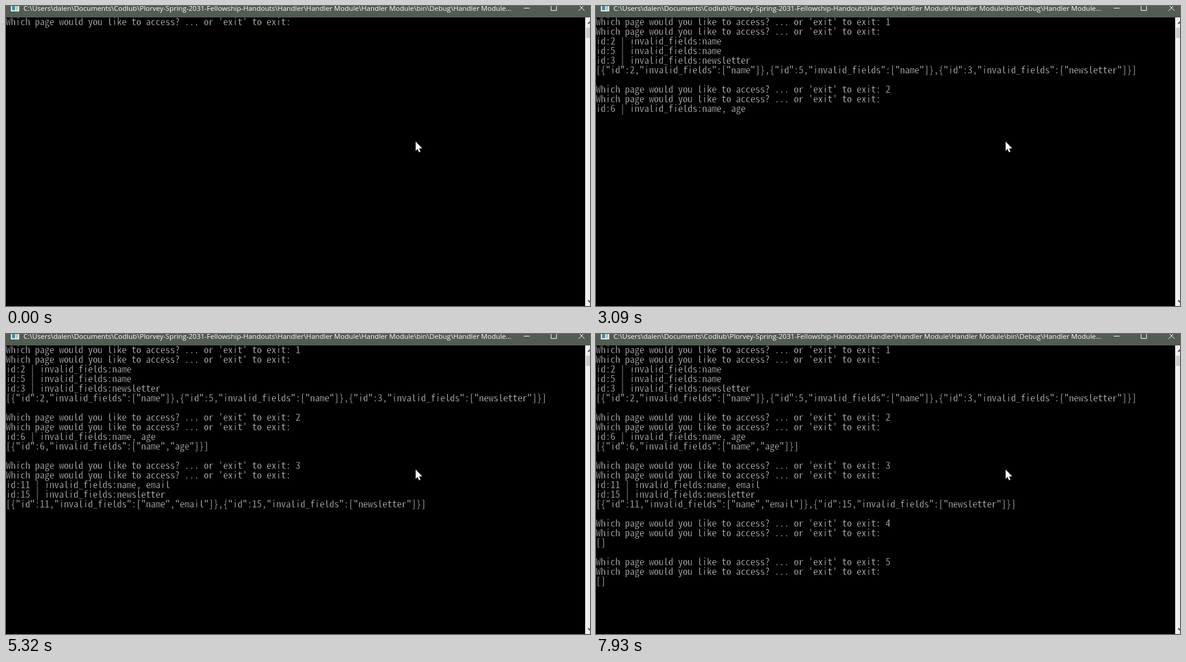
Write an HTML page with a canvas that moves like this. It is 968 px wide and 498 px high and loops after 8000 ms.

```html
<!DOCTYPE html>
<html lang="en">
<head>
<meta charset="utf-8">
<title>Console</title>
<style>
  html, body { margin: 0; width: 100%; height: 100%; overflow: hidden; background: #000; }
  canvas { display: block; }
</style>
</head>
<body>
<canvas id="stage" width="968" height="498"></canvas>
<script>
const ctx = document.getElementById('stage').getContext('2d');
const LOOP = 8000, CELL = 8, ROW = 16, TOP = 19;
const MONO = "'Noto Sans Mono CJK JP', 'Noto Sans Mono CJK SC', 'Noto Sans Mono', monospace";
const TITLE = 'C:\\Users\\dalen\\Documents\\Codlub\\Plorvey-Spring-2031-Fellowship-Handouts' +
  '\\Handler\\Handler Module\\Handler Module\\bin\\Debug\\Handler Module...';
const PROMPT = "Which page would you like to access? ... or 'exit' to exit: ";

const info = ([id, ...fields]) => `id:${id} | invalid_fields:${fields.join(', ')}\n`;
const json = list =>
  JSON.stringify(list.map(([id, ...fields]) => ({ id, invalid_fields: fields }))) + '\n\n';

const page1 = [[2, 'name'], [5, 'name'], [3, 'newsletter']];
const page2 = [[6, 'name', 'age']];
const page3 = [[11, 'name', 'email'], [15, 'newsletter']];
const lines = list => list.map(info).join('');

// [time in ms, text printed, caret visible]
const events = [
  [0, PROMPT, false],
  [510, '1', true],
  [590, '', false],
  [770, '\n' + PROMPT, false],
  [870, '', true],
  [1380, '\n' + lines(page1), false],
  [1460, json(page1), true],
  [2170, '', false],
  [2630, PROMPT, true],
  [2810, '2', true],
  [3040, '\n' + PROMPT, false],
  [3090, '\n' + lines(page2), false],
  [3140, json(page2), true],
  [3740, '', false],
  [3940, PROMPT, false],
  [3970, '', true],
  [4170, '3', true],
  [4250, '', false],
  [4480, '\n' + PROMPT, false],
  [4580, '\n' + lines(page3) + json(page3), true],
  [5320, '', false],
  [5500, PROMPT, true],
  [5830, '4', false],
  [6060, '\n' + PROMPT, false],
  [6160, '\n' + json([]), true],
  [6860, PROMPT, true],
  [7040, '5', true],
  [7230, '\n' + PROMPT, false],
  [7270, '\n' + json([]), false],
  [7310, '', true],
  [7930, '', false]
];

// Choose the font size whose advance equals one console cell
ctx.font = `100px ${MONO}`;
const monoFont = `${100 * CELL / ctx.measureText('0').width}px ${MONO}`;

function rect(color, x, y, w, h) {
  ctx.fillStyle = color;
  ctx.fillRect(x, y, w, h);
}

function path(points) {
  ctx.beginPath();
  points.forEach(([x, y]) => ctx.lineTo(x, y));
}

function polygon(color, points) {
  path(points);
  ctx.fillStyle = color;
  ctx.fill();
}

function drawTitleBar() {
  rect('#525c52', 0, 0, 968, TOP);
  rect('#e8eeee', 8, 0, 14, 9);
  rect('#3f8f96', 10, 0, 5, 7);
  rect('#b9c4c6', 16, 0, 4, 7);

  ctx.font = "11.55px 'Open Sans', 'Noto Sans', sans-serif";
  ctx.fillStyle = '#fff';
  ctx.fillText(TITLE, 29, 8);

  rect('#fff', 858, 3, 10, 1);
  ctx.strokeStyle = '#fff';
  ctx.lineWidth = 1;
  ctx.strokeRect(903.5, -1.5, 9, 9);
  path([[949, -2], [959, 8]]);
  ctx.stroke();
  path([[959, -2], [949, 8]]);
  ctx.stroke();
}

function drawScrollBar() {
  rect('#f0f0f0', 960, TOP, 8, 479);
  rect('#cdcdcd', 961, 36, 7, 17);
  polygon('#505050', [[964, 29], [968, 25], [968, 28], [966, 30]]);
  polygon('#505050', [[964, 489], [968, 493], [968, 490], [966, 488]]);
}

function drawConsole(time) {
  const past = events.filter(([start]) => start <= time);
  const rows = past.map(([, text]) => text).join('').split('\n');
  ctx.font = monoFont;
  ctx.fillStyle = '#c0c0c0';
  // A black outline over the fill thins the strokes
  ctx.strokeStyle = '#000';
  ctx.lineWidth = 0.3;
  ctx.lineJoin = 'round';
  rows.forEach((row, i) => {
    const y = TOP + 13 + i * ROW;
    ctx.fillText(row, 0, y);
    ctx.strokeText(row, 0, y);
  });

  const caretOn = past[past.length - 1][2];
  const last = rows.length - 1;
  if (caretOn) rect('#fff', rows[last].length * CELL, TOP + last * ROW + 12, CELL, 4);
}

function drawPointer() {
  const shape = [[0, 0], [0, 15.4], [3.2, 12.2], [5.6, 17.8], [8, 17], [5.6, 11.4], [10.8, 11.2]];
  polygon('#fff', shape.map(([x, y]) => [x + 679, y + 225]));
}

function draw(now) {
  rect('#000', 0, 0, 968, 498);
  drawConsole(Math.max(0, now - start) % LOOP);
  drawTitleBar();
  drawScrollBar();
  drawPointer();
  requestAnimationFrame(draw);
}

const start = performance.now();
draw(start);
</script>
</body>
</html>
```
